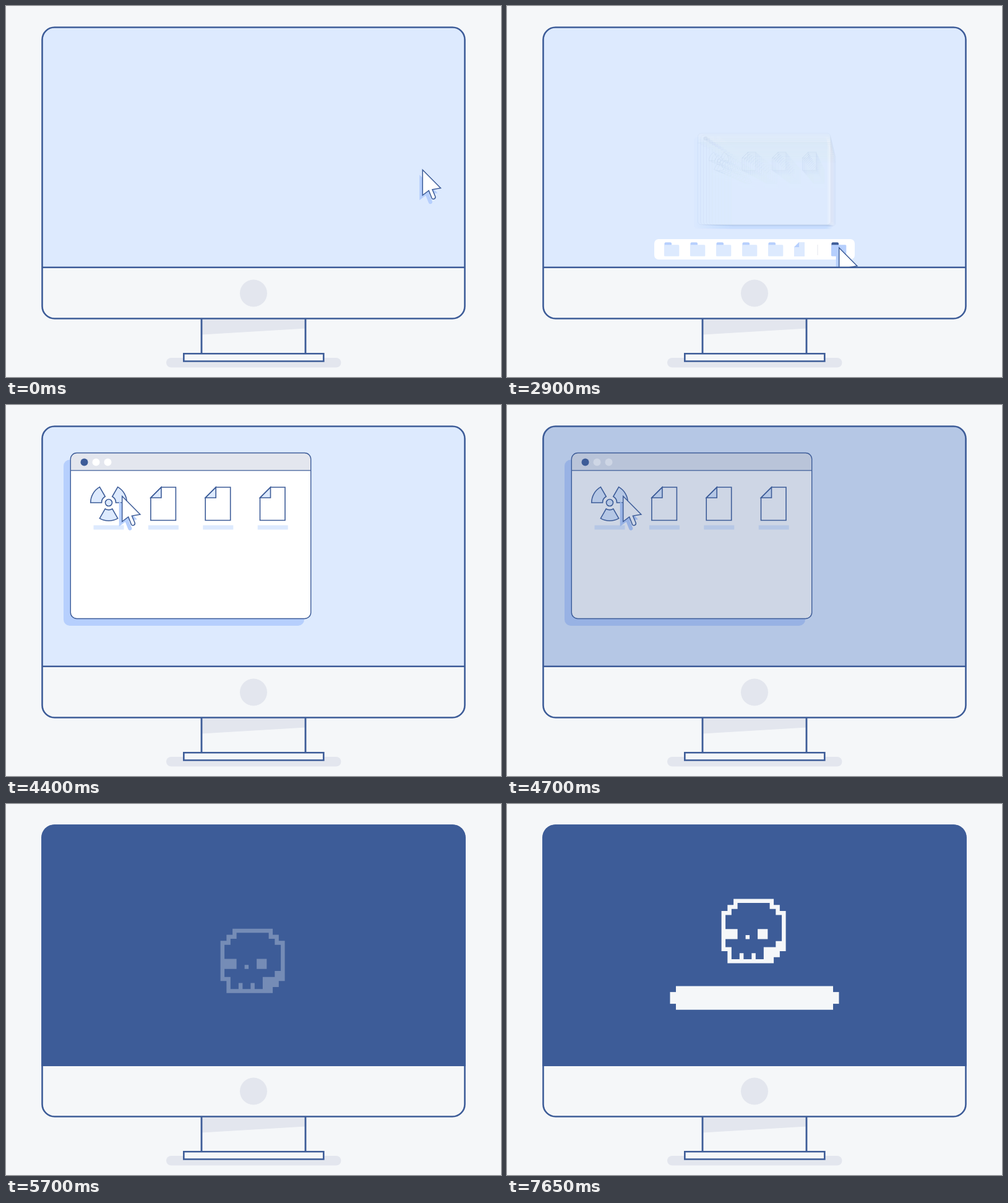
Write an HTML page with a canvas that moves like this. It is 800 px wide and 600 px high and loops after 8000 ms.

```html
<!DOCTYPE html>
<html lang="en">
<head>
<meta charset="utf-8">
<title>Infected desktop</title>
<style>
  html, body { margin: 0; width: 100%; height: 100%; overflow: hidden; background: #f5f7f9; }
  canvas { display: block; }
</style>
</head>
<body>
<canvas id="stage" width="800" height="600"></canvas>
<script>
const LOOP = 8000, STEP = 50;
const PAPER = '#f5f7f9', INK = '#3d5c98', SKY = '#ddeafe', SHADE = '#b6cffd', GREY = '#e3e6ee', WHITE = '#fff';
const ctx = document.getElementById('stage').getContext('2d');

const clamp = v => Math.min(1, Math.max(0, v));
const span = (t, from, to) => clamp((t - from) / (to - from));
const smooth = k => k * k * (3 - 2 * k);
const mix = (a, b, k) => a + (b - a) * k;
const bezier = (a, b, c, d, k) => {
  const m = 1 - k;
  return a * m * m * m + 3 * b * m * m * k + 3 * c * m * k * k + d * k * k * k;
};

function scoped(draw) {
  ctx.save();
  draw();
  ctx.restore();
}

function scaleAbout(x, y, sx, sy = sx) {
  ctx.translate(x, y);
  ctx.scale(sx, sy);
  ctx.translate(-x, -y);
}

function paint(path, fill, stroke, width = 1.6) {
  if (fill) {
    ctx.fillStyle = fill;
    ctx.fill(path);
  }
  if (stroke) {
    ctx.strokeStyle = stroke;
    ctx.lineWidth = width;
    ctx.stroke(path);
  }
}

function box(x, y, w, h, fill, radius = 0, stroke, width) {
  const path = new Path2D();
  path.roundRect(x, y, w, h, radius);
  paint(path, fill, stroke, width);
}

function disc(x, y, r, fill, stroke) {
  const path = new Path2D();
  path.arc(x, y, r, 0, Math.PI * 2);
  paint(path, fill, stroke);
}

const CURSOR = new Path2D('M0 0 29.2 29.5 15.7 31.8 20.6 43.2Q21.2 46 18.5 47Q16 47.8 14.8 45.6L10 33.5 0 41Z');
const ARROW = new Path2D('M528.5 302H543.5V320H551L536 338.5 521 320H528.5Z');
const PAGE = new Path2D('M17 0H40.5V53.5H0V17Z');
const FOLD = new Path2D('M0 17H17V0Z');
const SMALL_PAGE = new Path2D('M472 382H481V405H464V390Z');
const SMALL_FOLD = new Path2D('M464 390H472V382Z');

// Skull on a 32-unit grid: silhouette, hollow, eyes, nose, teeth
const SKULL = new Path2D(
  'M6 0H26V3H29V6H32V26H29V29H26V32H3V26H0V6H3V3H6Z' +
  'M8 2H24V5H27V8H30V21H27V24H21V30H5V24H2V8H5V5H8Z' +
  'M2 15H8V20H2ZM18 15H23V20H18ZM12 18H14V20H12ZM9 27H11V30H9ZM15 27H17V30H15Z');

function drawMonitor() {
  box(259, 569, 282.5, 15.5, GREY, 7.7);
  paint(new Path2D('M316 506H484V521.5L316 531.5Z'), GREY);
  paint(new Path2D('M316 506V562M484 506V562'), null, INK, 2.8);
  box(287.3, 562.2, 226, 12.3, PAPER, 0, INK, 2.6);
  disc(400, 464.5, 22, GREY);
}

function drawBezel() {
  box(58.5, 34.5, 683, 471, null, 20, INK, 2.6);
  paint(new Path2D('M58 422.7H742'), null, INK, 2.6);
}

function drawFolder(x, tab, body) {
  box(x + 0.5, 382.3, 11.5, 6, tab, [2, 2, 0, 0]);
  box(x, 386.2, 24.3, 18.6, body, 1.5);
}

function drawDock(t) {
  const lift = smooth(span(t, 270, 900)) - smooth(span(t, 2900, 3350));
  if (lift <= 0) return;
  scoped(() => {
    ctx.translate(0, 50 * (1 - lift));
    box(238, 377, 324, 33, WHITE, 7);
    for (let i = 0; i < 5; i++) drawFolder(254 + i * 42, SHADE, SKY);
    paint(SMALL_PAGE, SKY);
    paint(SMALL_FOLD, SHADE);
    box(501.5, 386, 1, 17, GREY);

    const age = t - 1580;
    if (age > 0) {
      const wobble = 0.6 * Math.exp(-age / 220) * Math.cos(age / 70);
      ctx.globalAlpha = span(age, 0, 100);
      scaleAbout(536, 405, 1 + wobble, 1 - wobble * 0.5);
      drawFolder(524, INK, SHADE);
    }
  });

  const shown = span(t, 800, 1000) * (1 - span(t, 1570, 1680));
  if (shown > 0) scoped(() => {
    ctx.globalAlpha = shown;
    ctx.translate(0, 66 * smooth(span(t, 1150, 1650)));
    paint(ARROW, INK);
  });
}

function drawHazard(press) {
  scoped(() => {
    ctx.translate(166, 158);
    ctx.scale(1 - 0.08 * press, 1 - 0.08 * press);
    for (const start of [1, 3, 5]) {
      const a = start * Math.PI / 3, b = a + Math.PI / 3;
      const blade = new Path2D();
      blade.arc(0, 0, 29.3, a, b);
      blade.arc(0, 0, 11.5, b, a, true);
      blade.closePath();
      paint(blade, SKY, INK);
    }
    disc(0, 0, 5.5, SKY, INK);
  });
}

function drawWindow(press) {
  box(93, 88.5, 389, 268.5, SHADE, 10);
  box(104.3, 77.5, 388.4, 268, WHITE, 10);
  box(104.3, 77.5, 388.4, 28.4, GREY, [10, 10, 0, 0]);
  paint(new Path2D('M104 105.9H493'), null, INK, 1.4);
  box(104.3, 77.5, 388.4, 268, null, 10, INK, 1.4);
  [INK, WHITE, WHITE].forEach((color, i) => disc(126.5 + i * 19, 92.5, 6, color));
  for (let i = 0; i < 4; i++) {
    box(141.5 + i * 88.4, 194.5, 49, 7, SKY);
    if (i) scoped(() => {
      ctx.translate(145.6 + i * 88.3, 133);
      paint(FOLD, SKY, INK);
      paint(PAGE, null, INK);
    });
  }
  drawHazard(press);
}

const openness = t => 1 - (1 - span(t, 2850, 3080)) ** 3;

// The opening window is smeared over a short shutter time
function drawOpening(t, press) {
  const open = openness(t + 4);
  if (open <= 0) return;
  const samples = open < 1 ? 12 : 1;
  const alpha = 1 - (1 - open) ** (1 / samples);
  for (let i = samples - 1; i >= 0; i--) scoped(() => {
    ctx.globalAlpha = alpha;
    scaleAbout(560, 364, openness(t + 4 - i * 1.3));
    drawWindow(press);
  });
}

function drawCursor(t, press) {
  const a = smooth(span(t, 1300, 2700)), b = smooth(span(t, 2950, 3905));
  const x = mix(bezier(673.3, 640, 587, 536.7, a), 187.7, b);
  const y = mix(bezier(265, 250, 270, 391, a), 147.5, b);
  scoped(() => {
    ctx.translate(x, y);
    ctx.scale(1 - 0.1 * press, 1 - 0.1 * press);
    scoped(() => {
      ctx.translate(-5, 8);
      paint(CURSOR, SHADE);
    });
    paint(CURSOR, WHITE, INK, 1.5);
  });
}

function drawSkull(t) {
  const k = span(t, 5530, 6050);
  scoped(() => {
    ctx.globalAlpha = k * mix(0.9, 1, k);
    ctx.translate(346.6, 153.6 + 80 * (1 - bezier(0, 1 / 3, 1, 1, k)));
    ctx.scale(3.25, 3.25);
    ctx.fillStyle = PAPER;
    ctx.fill(SKULL, 'evenodd');
  });
}

function drawProgress(t) {
  scoped(() => {
    ctx.globalAlpha = span(t, 6520, 6650);
    box(273, 294.5, 254, 9.6, PAPER);
    box(273, 323.1, 254, 9.6, PAPER);
    box(263.5, 304.1, 9.5, 19, PAPER);
    box(527, 304.1, 9.5, 19, PAPER);
    box(273, 303.6, 254 * span(t, 6690, 7650), 20, PAPER);
  });
}

function render(t) {
  ctx.fillStyle = PAPER;
  ctx.fillRect(0, 0, 800, 600);
  drawMonitor();

  const press = Math.abs(Math.sin(span(t, 4060, 4400) * Math.PI * 2));
  scoped(() => {
    const screen = new Path2D();
    screen.roundRect(58.5, 34.5, 683, 388, [20, 20, 0, 0]);
    ctx.clip(screen);
    paint(screen, SKY);
    drawDock(t);
    drawOpening(t, press);
    drawCursor(t, press);
  });
  drawBezel();

  // One flicker, then the screen goes dark
  const flicker = 0.7 * Math.min(span(t, 4500, 4610), 1 - span(t, 4610, 4750));
  scoped(() => {
    ctx.globalAlpha = Math.max(flicker, span(t, 4850, 5000));
    box(57.2, 33.2, 685.6, 390.8, INK, [21, 21, 0, 0]);
  });
  drawSkull(t);
  drawProgress(t);
}

const begin = performance.now();
function tick() {
  const t = (performance.now() - begin) % LOOP;
  render(Math.floor(t / STEP) * STEP);
  requestAnimationFrame(tick);
}
tick();
</script>
</body>
</html>
```
